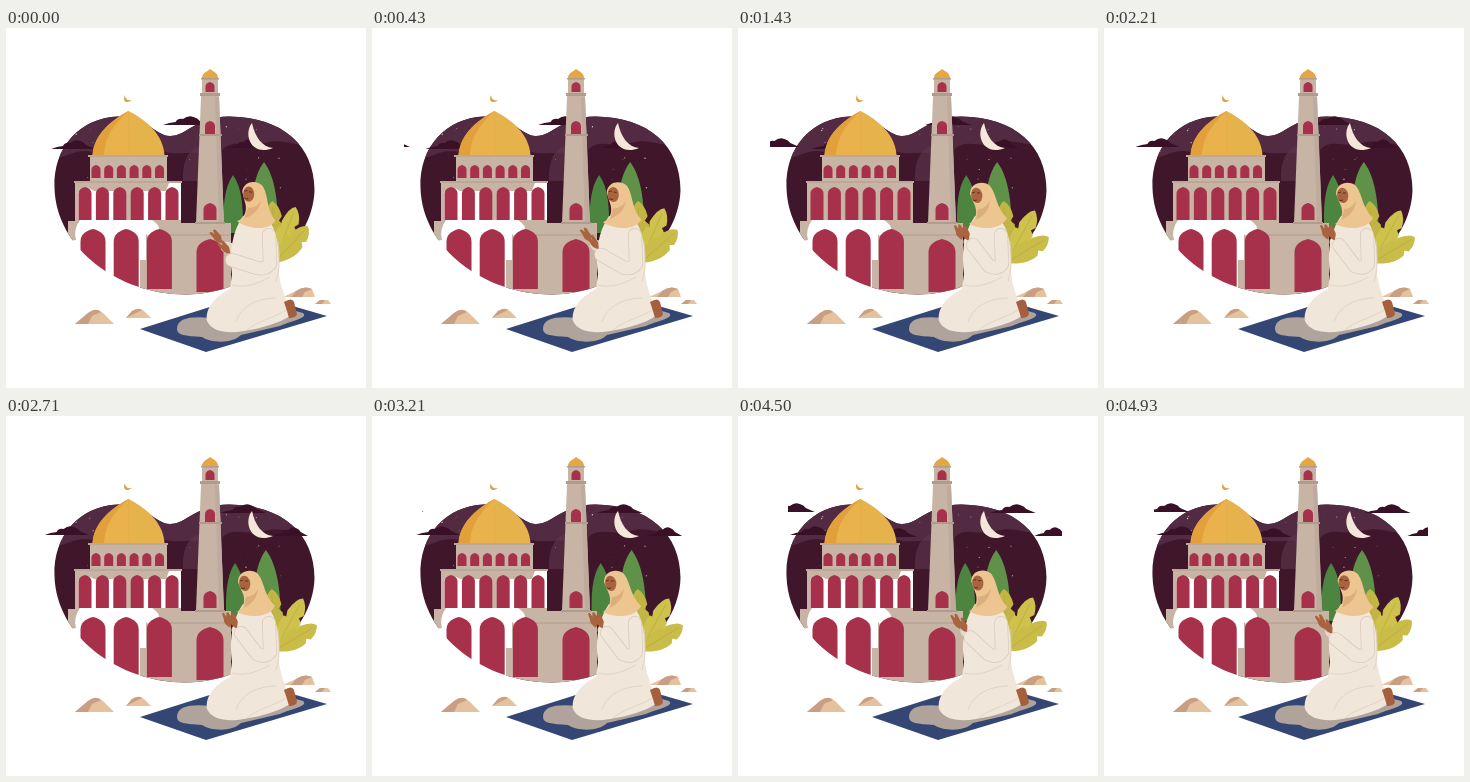
Write an HTML page that moves like this. It is 360 px wide and 360 px high and loops after 5 s.

```html
<!DOCTYPE html>
<html lang="en">
<head>
<meta charset="utf-8">
<title>Evening prayer</title>
<style>
html, body { margin: 0; width: 100%; height: 100%; overflow: hidden; background: #fff; }
svg { display: block; width: 100vw; height: 100vh; }
</style>
</head>
<body>
<svg viewBox="0 0 360 360">
  <defs>
    <path id="blob" d="M48.5 160C47 119 74 90 112 88.5C142 88 147 107 164 108C181 108 190 88.5 223 88.5C277 89 308.5 118 308.5 162C307 220 242 266 180 266.5C112 266.5 50 220 48.5 160Z"/>
    <clipPath id="inBlob"><use href="#blob"/></clipPath>
    <clipPath id="sky"><path d="M50 80H325V105H324V130H32V105H50Z"/></clipPath>
    <path id="cloud" fill="#3a1026" d="M0 0L6-2L12-3Q14-7 19-6Q24-10 29-8Q33-7 35-4L44 0Z"/>
  </defs>

  <use href="#blob" fill="#40172a"/>
  <g clip-path="url(#inBlob)">
    <path fill="#522b42" d="M45 130C62 131 68 120 87 124H160C170 127 183 124 194 125H214C224 108 242 121 258 115C278 109 288 120 305 115V80H45Z"/>
    <path fill="#5d374d" opacity=".6" d="M177 153C176 133 183 120 194 118V153Z"/>
    <g id="stars" fill="#f5e9e4"></g>
  </g>
  <g id="clouds" clip-path="url(#sky)"></g>
  <path fill="#f4e7da" d="M246 95C237 106 245 129 267 120C256 119 249 109 246 95Z"/>

  <g id="trees">
    <path fill="#4c8440" d="M228 147C219 160 218 180 219 205H238C239 180 237 159 228 147Z"/>
    <path fill="#5f9148" d="M259 134C248 148 245 175 247 210H273C274 178 271 150 259 134Z"/>
  </g>
  <g id="plant"></g>

  <g clip-path="url(#inBlob)">
    <path fill="#c7b4a5" d="M62 193H69V195H225V268H62ZM69 153H175V196H69ZM84 127H161V154H84Z"/>
    <path fill="#bba899" d="M163 206H224V208H163ZM82 127H162V129H82ZM68 153H176V155H68Z"/>
  </g>
  <path id="upperGap" fill="#fff" d="M72 192V164Q80 157 88 163H118V192ZM127 192V163H160L163 155H175V192Z"/>
  <path fill="#fff" d="M70 212Q67 202 74 192H146Q158 200 150 207Q142 210 140 206V232H134V268H58V214Z"/>
  <g id="arches" fill="#a7314b" clip-path="url(#inBlob)"></g>

  <path fill="#e6b24c" d="M86.5 127C88 106 106 92 122.5 83C140 92 157 106 158.5 127Z"/>
  <path fill="#e2a03b" d="M86.5 127C88 106 106 92 122.5 83V127Z"/>
  <path fill="#eab24d" d="M122.5 83C105 99 99 111 98 127H122.5Z"/>
  <path fill="#dfa04a" d="M119 67C116 74 121 76 126 72C122 73 119 71 119 67Z"/>

  <path fill="#c7b4a5" d="M196 51H212V66L213 69L218 195H190L195 69L196 66Z"/>
  <path fill="#bfab9d" d="M209 69H213L218 195H213Z"/>
  <path fill="#b09b8e" d="M195 50H213V51.5H195ZM194 65H214V68H194ZM193 106H216V108H193ZM189 194H219V196H189Z"/>
  <path fill="#e5a644" d="M196 50C196 45 201 44 204 41C208 44 212 45 212 50Z"/>
  <g id="towerWindows" fill="#a7314b"></g>

  <g fill="#e6c19e">
    <path d="M69 296L82 285Q90 279 97 285L108 296Z"/>
    <path d="M120 290L126 283Q133 279 138 283L145 290Z"/>
    <path d="M277 269L290 263Q298 257 306 261L309 269Z"/>
    <path d="M309 276L314 272H322L325 276Z"/>
  </g>
  <path fill="#c99f83" d="M69 296L82 285Q90 279 95 284L86 288L82 296ZM120 290L126 283Q133 279 136 282L128 286ZM290 263Q298 257 306 261L299 264L296 269H285ZM309 276L314 272H319L316 276Z"/>

  <path fill="#344673" d="M134 301L245 266L321 288L200 324Z"/>
  <path fill="#b0a39b" d="M171 301C171 290 185 288 205 290L275 279L297 285C303 290 285 293 274 298L235 307C226 316 205 315 196 309C179 308 171 307 171 301Z"/>

  <path id="farArm" fill="none" stroke="#e5d8ca" stroke-width="11" stroke-linecap="round"/>
  <g id="farHand"></g>
  <path fill="#f0e6da" d="M237 188C226 204 223 225 226 246L224 261C208 269 199 281 201 293C206 304 222 306 238 303C257 300 273 295 284 288C285 279 276 268 273 246C274 220 271 202 262 191Z"/>
  <path fill="none" stroke="#dfd0c1" stroke-width=".8" d="M226 257C239 260 249 257 264 249M230 294C236 275 257 270 270 270M241 302C251 293 268 290 282 281M272 213Q275 240 270 254"/>
  <path fill="#a55f3c" d="M278 274Q286 269 288 274L291 286Q290 290 283 290L281 283Z"/>
  <g id="nearHand"></g>
  <path id="armEdge" fill="none" stroke="#d8c9bb" stroke-width="14" stroke-linejoin="round" stroke-linecap="round"/>
  <path id="nearArm" fill="none" stroke="#f0e6da" stroke-width="12.6" stroke-linejoin="round" stroke-linecap="round"/>
  <g id="head">
    <path fill="#edc591" d="M232 166C232 154 246 152 252 158C259 167 258 180 269 190C264 201 244 203 231 196C239 191 239 184 237 178Z"/>
    <path fill="#dbae7b" d="M240 181C246 181 250 177 252 172C251 182 247 187 238 192Z"/>
    <ellipse cx="238.8" cy="167.5" rx="5.6" ry="7.6" fill="#a9643f" transform="rotate(-8 238 168)"/>
    <path fill="none" stroke="#4b2520" stroke-width=".8" d="M234 165L237 164M239 165L242 165M235 172Q237 173 239 172"/>
  </g>
</svg>
<script>
const LOOP = 5000;
const $ = id => document.getElementById(id);

const arch = (cx, top, w, bottom) => {
  const l = cx - w / 2, r = cx + w / 2, spring = top + w * .5;
  return `<path d="M${l} ${bottom}V${spring}Q${l} ${top + w * .12} ${cx} ${top}Q${r} ${top + w * .12} ${r} ${spring}V${bottom}Z"/>`;
};
const row = (count, first, step, top, w, bottom) =>
  Array.from({ length: count }, (_, i) => arch(first + i * step, top, w, bottom)).join('');

$('arches').innerHTML = row(6, 90, 12.7, 137, 9, 150) + row(6, 79, 17.4, 159, 13, 192)
  + row(3, 87, 33.2, 201, 25, 261) + arch(204, 211, 27, 264);
$('towerWindows').innerHTML = arch(204, 54, 9, 64) + arch(204, 93, 10, 106) + arch(204, 175, 13, 192);

// Leaves: length, angle, colour
const leaves = [[62, -2, '#c2b543'], [60, 29, '#cfc24c'], [50, 59, '#c9bc48']];
$('plant').innerHTML = leaves.map(([len, , color]) => {
  const y = k => -len * k;
  return `<g><path fill="${color}" d="M0 0C-8 ${y(.2)} -11 ${y(.4)} -9 ${y(.6)}L-6 ${y(.6)}L-8 ${y(.7)}Q-6 ${y(.95)} 0 ${y(1)}Q7 ${y(.92)} 9 ${y(.75)}L6 ${y(.68)}L10 ${y(.62)}C12 ${y(.4)} 8 ${y(.2)} 0 0Z"/><path stroke="#b3a83c" stroke-width=".6" d="M0 0V${y(.9)}"/></g>`;
}).join('');
const leafNodes = [...$('plant').children];

let seed = 17;
const random = () => (seed = seed * 16807 % 2147483647) / 2147483647;
$('stars').innerHTML = Array.from({ length: 34 }, () =>
  `<circle cx="${55 + random() * 245}" cy="${98 + random() * 62}" r="${.35 + random() * .4}"/>`).join('');
const stars = [...$('stars').children];

$('farHand').innerHTML = $('nearHand').innerHTML =
  '<path fill="#a9643f" d="M5 8Q-2 6-3 1L-6-4Q-5-6-3-4L-1-2L-2-6Q0-8 2-4L5 1Z"/>';

// Left edge (seconds), baseline, horizontal scale
const clouds = [
  [t => 157 + 21 * t, 97, 1.05],
  [t => -55 + 19.5 * t, 96, 1],
  [t => 45 + 20 * t, 121, 1],
  [t => -18 + 29 * t - 3 * t * t, 119, 1],
  [t => 222 + 16.5 * t, 120, .8]
];
$('clouds').innerHTML = clouds.map(() => '<use href="#cloud"/>').join('');
const cloudNodes = [...$('clouds').children];

function tween(keys, t) {
  const i = Math.max(1, keys.findIndex(([time]) => time >= t));
  const [t0, a] = keys[i - 1], [t1, b] = keys[i];
  const k = (t - t0) / (t1 - t0);
  return a + (b - a) * k * k * (3 - 2 * k);
}
const openness = [[0, 1], [.95, .18], [1.5, 0], [3.6, 0], [5, .4]];
const place = (id, transform) => $(id).setAttribute('transform', transform);

function draw(t) {
  clouds.forEach(([left, y, scale], i) =>
    cloudNodes[i].setAttribute('transform', `translate(${left(t)} ${y}) scale(${scale} 1)`));
  stars.forEach((star, i) => star.setAttribute('opacity', .45 + .4 * Math.cos(t * 2 + i * 1.7)));
  place('trees', `skewX(${-.4 * Math.cos(t / 5 * 2 * Math.PI)})`);
  $('upperGap').setAttribute('opacity', t < 1.2 || t > 2.6 ? 1 : 0);

  const open = tween(openness, t);
  leaves.forEach(([, angle], i) =>
    leafNodes[i].setAttribute('transform', `translate(268 235) rotate(${angle * (1 - .27 * open)})`));

  const fx = 221 - 11 * open, fy = 203 + 5 * open;
  const nx = 227 - 9 * open, ny = 204 + 15 * open;
  place('farHand', `translate(${fx} ${fy}) rotate(${12 - 22 * open})`);
  place('nearHand', `translate(${nx} ${ny}) rotate(${8 - 20 * open})`);
  $('farArm').setAttribute('d', `M242 226L${fx + 10} ${fy + 11}`);
  const arm = `M263 207L264 236Q259 242 251 ${238 + open * 2}L${nx + 8} ${ny + 13}`;
  $('armEdge').setAttribute('d', arm);
  $('nearArm').setAttribute('d', arm);
  place('head', `rotate(${8 * open} 250 195)`);
}

function frame(now) {
  draw(now % LOOP / 1000);
  requestAnimationFrame(frame);
}
requestAnimationFrame(frame);
</script>
</body>
</html>
```
